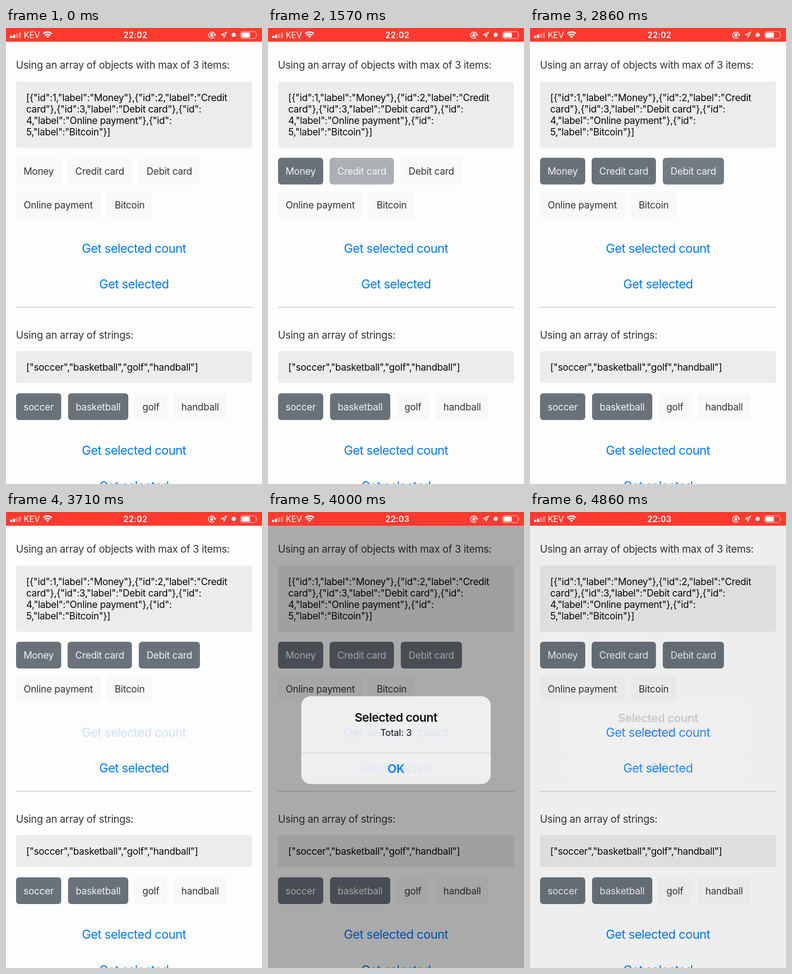
These frames come from a looping animation (561x998 px, 5010 ms). An HTML page:

```html
<!DOCTYPE html>
<html lang="en">
<head>
<meta charset="utf-8">
<style>
  html, body { margin: 0; width: 100%; height: 100%; overflow: hidden; background: #fefdfe; }
  svg { display: block; width: 561px; height: 998px; font-family: Inter, sans-serif; }
  .label { font-size: 22.4px; letter-spacing: -.36px; fill: #343438; }
  .code { font-size: 20.9px; letter-spacing: -.35px; fill: #060608; }
  .box { fill: #edebee; }
  .chip { font-size: 20.9px; letter-spacing: -.22px; text-anchor: middle; fill: #343438; }
  .chip rect { fill: #f8f7f9; }
  .chip.on { fill: #f2f3f4; }
  .chip.on rect { fill: #69727a; }
  .link { font-size: 26.9px; letter-spacing: -.64px; text-anchor: middle; fill: #007aff; }
  #alert { text-anchor: middle; }
  .title { font-size: 25.4px; font-weight: 600; letter-spacing: -.61px; }
  .message { font-size: 19.4px; letter-spacing: -.12px; }
  .status { font-size: 18px; fill: #fff; }
  .line { fill: none; stroke: #fff; }
</style>
</head>
<body>
<svg viewBox="0 0 561 998">
  <g id="page"></g>
  <rect id="dim" y="30" width="561" height="968"/>
  <g id="alert">
    <rect x="79" y="406" width="403" height="186.5" rx="20" fill="#f8f8fa"/>
    <path d="M79 526.5h403" stroke="#d0d0d5"/>
    <text class="title" x="280.5" y="460">Selected count</text>
    <text class="message" x="280.5" y="490">Total: 3</text>
    <text class="title" x="280.5" y="569" fill="#007aff">OK</text>
  </g>
  <rect width="561" height="30" fill="#ff3b30"/>
  <g id="status" class="status">
    <text x="39" y="22">KEV</text>
    <text id="clock" x="283.5" y="22" text-anchor="middle" font-weight="600" letter-spacing=".2"></text>
    <path class="line" stroke-width="3" d="M81.6 12.6a13.3 13.3 0 0 1 18.8 0M85.1 16.1a8.3 8.3 0 0 1 11.8 0"/>
    <path d="M91 22l-3.5-3.5a5 5 0 0 1 7 0z"/>
    <path class="line" stroke-width="1.6" d="M456.5 20a7 7 0 1 1 1.5-5M449.3 15v-2a1.8 1.8 0 0 1 3.6 0v2"/>
    <path d="M448 14.5h6v4.5h-6zM455 14h6l-3 3.5z"/>
    <path class="line" stroke-width="1.5" d="M483.5 9l-12 6h6v6z"/>
    <circle cx="499" cy="15" r="4.5"/>
    <rect class="line" stroke-opacity=".6" stroke-width="1.3" x="514" y="8" width="34" height="15" rx="4"/>
    <rect x="516" y="10" width="18.5" height="11" rx="2"/>
    <path d="M549.5 13q2.5 2.5 0 5z" opacity=".6"/>
  </g>
</svg>
<script>
const LOOP = 5010;
// The picture only updates at these moments (ms).
const TICKS = [0, 1000, 1140, 1290, 1570, 1710, 1860, 2710, 2860, 3000,
  3710, 3860, 4000, 4140, 4290, 4710, 4860];
const CENTER = [280.5, 499.3];
const $ = id => document.getElementById(id);

const text = (cls, x, y, s) => `<text class="${cls}" x="${x}" y="${y}">${s}</text>`;
const link = (y, s) => text('link', CENTER[0], y, s);
const chip = (x, y, right, s, on = '') => `<g class="chip ${on}">
  <rect x="${x}" y="${y}" width="${right - x}" height="58.5" rx="7"/>
  <text x="${(x + right) / 2}" y="${y + 37}">${s}</text></g>`;
const code = (y, height, lines) =>
  `<rect class="box" x="22" y="${y}" width="517" height="${height}" rx="5"/>` +
  lines.map((s, i) => text('code', 44.3, y + 43 + i * 25, s)).join('');

$('page').innerHTML =
  text('label', 21.8, 89, 'Using an array of objects with max of 3 items:') +
  code(117, 145, [
    '[{"id":1,"label":"Money"},{"id":2,"label":"Credit',
    'card"},{"id":3,"label":"Debit card"},{"id":',
    '4,"label":"Online payment"},{"id":',
    '5,"label":"Bitcoin"}]']) +
  chip(22, 284, 121, 'Money') +
  chip(135, 284, 276, 'Credit card') +
  chip(291, 284, 425, 'Debit card') +
  chip(22, 357.5, 207, 'Online payment') +
  chip(221, 357.5, 321, 'Bitcoin') +
  link(492, 'Get selected count') +
  link(570, 'Get selected') +
  '<rect x="22" y="610.5" width="517" height="1.8" fill="#cfcdd3"/>' +
  text('label', 21.8, 680, 'Using an array of strings:') +
  code(707, 70, ['["soccer","basketball","golf","handball"]']) +
  chip(22, 799.5, 121, 'soccer', 'on') +
  chip(136, 799.5, 268, 'basketball', 'on') +
  chip(282, 799.5, 353, 'golf') +
  chip(368, 799.5, 483, 'handball') +
  link(934, 'Get selected count') +
  link(1012, 'Get selected');

// Signal strength: two of four bars lit.
$('status').insertAdjacentHTML('beforeend', [0, 1, 2, 3].map(i =>
  `<rect x="${9 + i * 6.4}" y="${17 - i * 2.6}" width="4.8" height="${5 + i * 2.6}" rx="1" opacity="${i < 2 ? 1 : .35}"/>`).join(''));

const chips = document.querySelectorAll('.chip');
const countLink = document.querySelector('.link');
const pressTimes = [1000, 1570, 2710];

function draw(now) {
  const clock = now % LOOP;
  const t = TICKS.findLast(tick => tick <= clock);

  pressTimes.forEach((start, i) => {
    const on = t >= start;
    const left = 1 - Math.min(1, Math.max(0, (t - start) / 250));
    chips[i].classList.toggle('on', on);
    chips[i].style.opacity = on ? 1 - .45 * left ** 2 : 1;
  });
  countLink.style.opacity = t >= 3710 && t < 4000 ? .2 : 1;

  // The alert settles exponentially, then fades out.
  const open = t >= 3860;
  const rest = Math.exp((3740 - t) / 138);
  const fade = open ? 1 - Math.max(0, t - 4710) / 176 : 0;
  const scale = open ? 1 + .2 * rest : 1;
  const [x, y] = CENTER;
  $('dim').style.opacity = fade * .39 * (1 - rest);
  $('alert').style.opacity = fade * (1 - .72 * rest);
  $('alert').setAttribute('transform', `translate(${x} ${y}) scale(${scale}) translate(${-x} ${-y})`);
  $('clock').textContent = open ? '22:03' : '22:02';
}

const begin = performance.now();
function loop() {
  draw(performance.now() - begin);
  requestAnimationFrame(loop);
}
loop();
</script>
</body>
</html>
```
